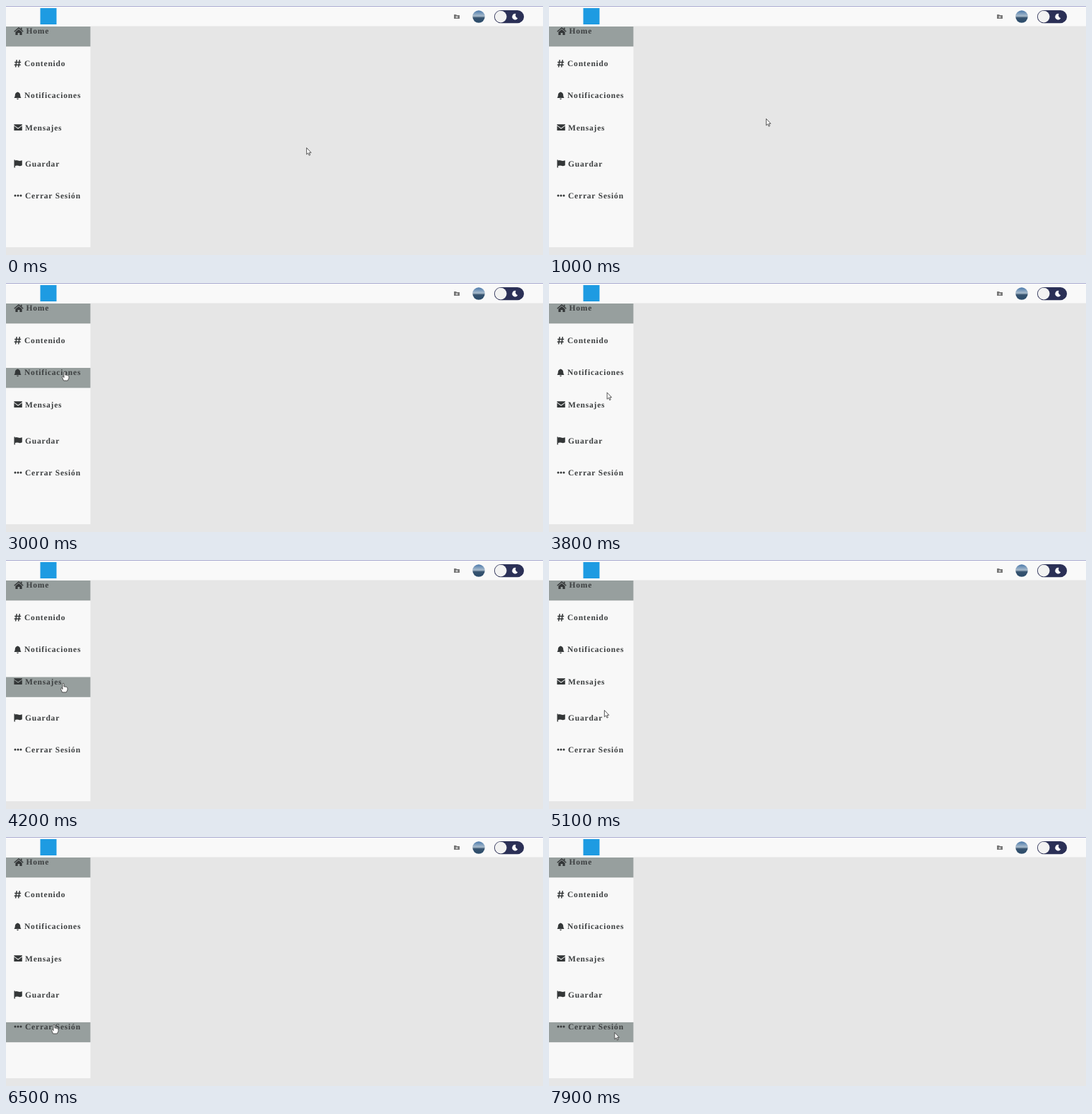
Animation of 760x352 px, one loop 8000 ms. Source, as an HTML page:

```html
<!DOCTYPE html>
<html lang="es">
<head>
<meta charset="utf-8">
<style>
html, body { margin: 0; height: 100%; overflow: hidden; background: #e6e6e6; }
svg { display: block; width: 760px; height: 352px; }
text { font: bold 11.5px "Liberation Serif", "Times New Roman", serif; letter-spacing: .8px; text-rendering: geometricPrecision; fill: #3c3f40; }
.icon { fill: #343738; }
.line { fill: none; stroke: #343738; stroke-width: 1.5; }
.pointer { fill: #fff; stroke: #333; stroke-width: .8; stroke-linejoin: round; }
</style>
</head>
<body>
<svg viewBox="0 0 760 352">
  <defs>
    <linearGradient id="sea" x2="0" y2="1">
      <stop offset="0" stop-color="#4a78aa"/>
      <stop offset=".45" stop-color="#a9bccd"/>
      <stop offset=".6" stop-color="#36536f"/>
      <stop offset="1" stop-color="#2c4c6b"/>
    </linearGradient>
  </defs>
  <rect width="119.5" height="341" fill="#f8f8f8"/>
  <g id="menu"></g>

  <rect width="760" height="28.5" fill="#f9f9f9"/>
  <rect width="760" height="1" fill="#a9aad0"/>
  <rect x="48.5" y="3" width="23" height="23" fill="#1e9be2"/>
  <path fill="#777" d="M634 12h3l1 1h4v5h-8z"/>
  <path stroke="#f9f9f9" stroke-width=".8" d="M636.4 15.6h3.2m-1.6-1.6v3.2"/>
  <circle cx="669" cy="15" r="8.7" fill="url(#sea)"/>
  <rect x="691" y="6" width="42" height="18.3" rx="9.15" fill="#2b3056"/>
  <circle cx="700.2" cy="15.1" r="8.4" fill="#f2f2f2"/>
  <path fill="#fff" d="M721.6 11a4.2 4.2 0 1 0 2.6 6.200a4.200 4.200 0 0 1-2.600-6.200z"/>

  <g id="cursor" class="pointer">
    <path id="arrow" d="M.4.4V9.800L2.600 7.800 4 11.200 5.500 10.500 4.100 7.300H6.900z"/>
    <path id="hand" d="M-1 8V1.300a1 1 0 0 1 2 0V5q5 0 5 2.400v2.400L4.300 13H-1.500L-3.500 8.300q1-3 2.500.4z"/>
  </g>
</svg>
<script>
const $ = id => document.getElementById(id);

// icons are drawn from the top left corner of a row
const items = [
  ['Home', 28.5, '<path class="line" d="M11.700 7.300 18 2l6.300 5.300"/><path class="icon" d="M13.400 7.800 18 4l4.600 3.800V12h-3.200V9h-2.800v3h-3.200zM20.800 1.700h1.800v3l-1.800-1.500z"/>'],
  ['Contenido', 26, '<path class="line" d="M15.200 1.700 13.600 12M19.300 1.700 17.700 12M12.200 5h9M11.700 8.700h9"/>'],
  ['Notificaciones', 26, '<path class="icon" d="M11.500 10q1.300-1.200 1.300-3.700q0-3.600 3.700-4.700q3.700 1.100 3.700 4.700q0 2.500 1.300 3.700zM15 10.700h3q-1.500 3-3 0z"/>'],
  ['Mensajes', 27, '<path class="icon" d="M11.400 3V1.800h11.400V3l-5.700 4zM11.400 4.100l5.700 4.100 5.700-4.100v6.500H11.400z"/>'],
  ['Guardar', 27, '<path class="icon" d="M11.500 1.200h1.400v1q2-1 4.200 0t5.700-.4v7q-3 1.500-5.200.6t-4.700.2v2.600h-1.400z"/>'],
  ['Cerrar Sesión', 27, '<path class="line" style="stroke-width:3;stroke-linecap:round;stroke-dasharray:0 4" d="M13 6h8.100"/>']
];
const rowTop = i => 29 + 45.5 * i + (i > 3 ? 5.4 : 0);
const rowHeight = 28.3;

$('menu').innerHTML = items.map(([label, x, icon], i) => `<g transform="translate(0 ${rowTop(i)})">
  <rect class="bar" width="119.5" height="${rowHeight}" fill="#979f9e"/>
  ${icon}<text x="${x}" y="10.300">${label}</text></g>`).join('');
const bars = document.querySelectorAll('.bar');

// glides of the pointer: begin and end in tenths of a second, then the place reached
const glides = [
  [7, 10, 307, 159], [10, 11, 257, 136], [12, 14, 123, 89], [15, 18, 84, 88],
  [25, 27, 84, 117], [28, 30, 83, 125], [35, 40, 81, 174], [48, 49, 79, 193],
  [50, 51, 78, 212], [52, 53, 77.5, 228], [61, 63, 74, 254], [64, 65, 68, 265],
  [77, 79, 92.5, 276]
];
function pointerAt(tick) {
  let x = 425, y = 200;
  for (const [begin, end, toX, toY] of glides) {
    const part = Math.min(1, Math.max(0, (tick - begin) / (end - begin)));
    x += (toX - x) * part;
    y += (toY - y) * part;
  }
  return [x, y];
}

const start = performance.now();
function draw() {
  const tick = Math.floor((performance.now() - start) % 8000 / 100);
  const [x, y] = pointerAt(tick);
  const depth = i => y - rowTop(i);
  const hovered = x < 119.5 ? items.findIndex((_, i) => depth(i) >= 0 && depth(i) < rowHeight) : -1;
  const hand = hovered >= 0 && x < 90 && depth(hovered) < 27;

  $('cursor').setAttribute('transform', `translate(${x} ${y})`);
  $('hand').style.display = hand ? '' : 'none';
  $('arrow').style.display = hand ? 'none' : '';
  bars.forEach((bar, i) => bar.style.display = i === 0 || i === hovered ? '' : 'none');
  requestAnimationFrame(draw);
}
draw();
</script>
</body>
</html>
```
